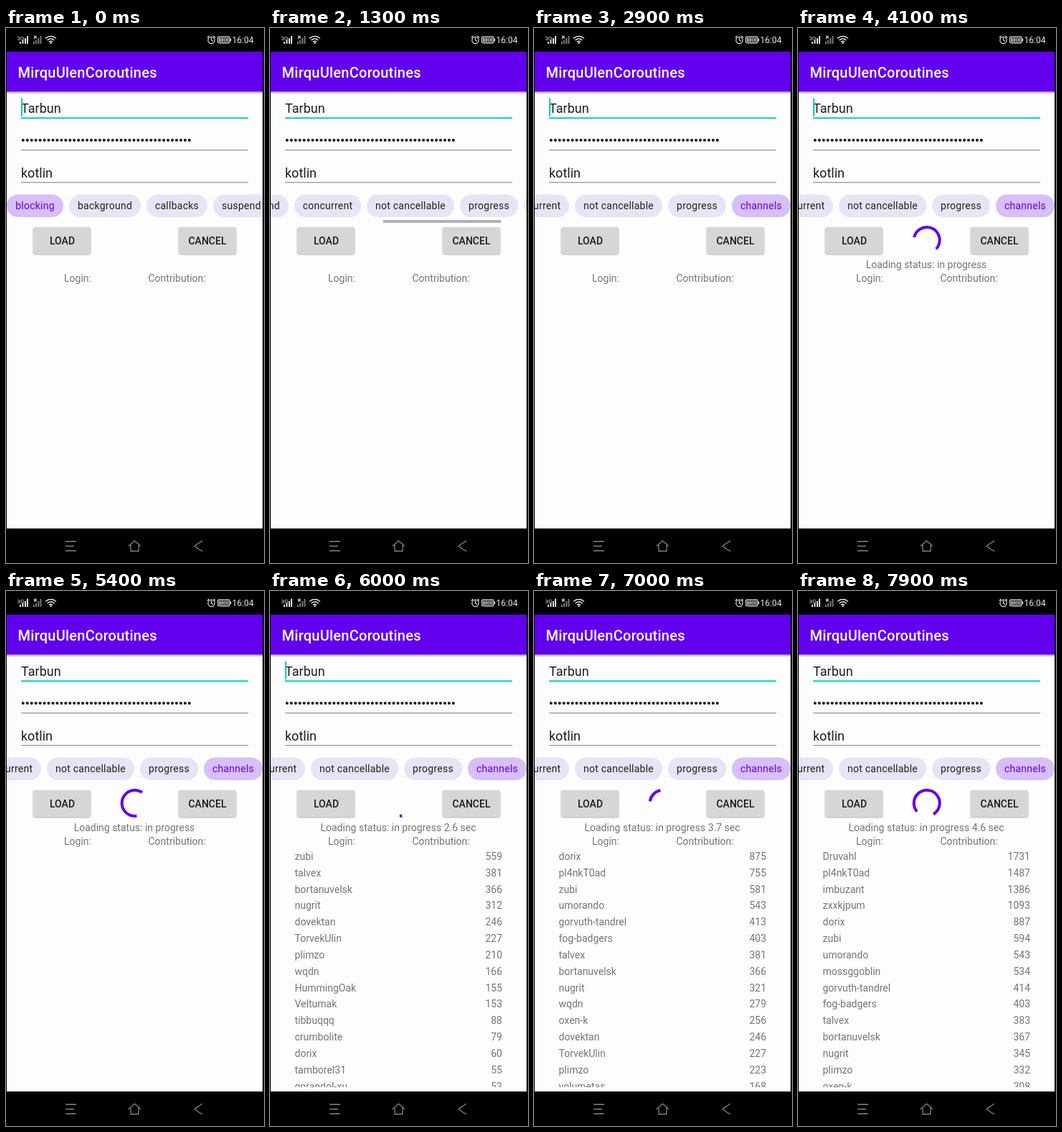
Animation of 360 by 744 pixels, one loop 8000 ms. Source, as an HTML page:

```html
<!DOCTYPE html>
<html lang="en">
<head>
<meta charset="utf-8">
<title>Coroutines demo</title>
<style>
  html, body { margin: 0; width: 100%; height: 100%; overflow: hidden; background: #000; }
  svg { display: block; font-family: Roboto, sans-serif; }
  .field { font-size: 18px; fill: #1d1d1d; }
  .chip { font-size: 14px; letter-spacing: .25px; fill: #222; text-anchor: middle; }
  .button { font-size: 14px; font-weight: 500; fill: #1c1c1c; text-anchor: middle; }
  .label { font-size: 14px; fill: #757575; }
  .mid { text-anchor: middle; }
  .end { text-anchor: end; }
  .line { fill: none; stroke: #858585; stroke-width: 1.3; }
  .icon { fill: none; stroke: #e4e4e4; stroke-width: 1.2; }
</style>
</head>
<body>
<svg width="360" height="744" viewBox="0 0 360 744">
  <defs>
    <clipPath id="screen"><rect x="1" y="33" width="357" height="663"/></clipPath>
    <clipPath id="listArea"><rect x="1" y="358" width="357" height="332"/></clipPath>
    <linearGradient id="barShadow" x2="0" y2="1">
      <stop stop-color="#000" stop-opacity=".3"/>
      <stop offset="1" stop-color="#000" stop-opacity="0"/>
    </linearGradient>
    <filter id="lift" x="-10%" y="-20%" width="120%" height="150%">
      <feDropShadow dx="0" dy="1" stdDeviation=".9" flood-opacity=".32"/>
    </filter>
  </defs>
  <rect width="360" height="744"/>

  <!-- status bar -->
  <g fill="#e4e4e4">
    <text x="15.5" y="17" font-size="8">3G</text>
    <path d="M19 22v-3h2v3zM22.500 22v-5h2v5zM26 22v-8h2v8zM29 22v-11h2v11z"/>
    <path fill="#777" d="M38 22v-3h2v3zM41 22v-5h2v5zM44.300 22v-8h2v8zM47.500 22v-11h2v11z"/>
    <path class="icon" d="M39 11l3.500 3.500M42.500 11l-3.500 3.500"/>
    <path class="icon" style="stroke-width:1.5" d="M55 14.500q7.500-6 15 0M57.500 17q5-4 10 0M60 19.300q2.500-2 5 0"/>
    <circle cx="62.500" cy="20.800" r="1.300"/>
    <path class="icon" d="M286.500 13.500v3.500l2.500 1.500M281 13.500l2.500-2.500M292 13.500l-2.500-2.500"/>
    <circle class="icon" cx="286.500" cy="17" r="4.600"/>
    <rect class="icon" x="295.600" y="12.200" width="16.500" height="8.600" rx="1.500"/>
    <rect x="297" y="13.600" width="13.700" height="5.800" fill="#aaa"/>
    <rect x="312.700" y="14.700" width="1.500" height="3.600"/>
    <text class="mid" x="304" y="19" font-size="7" fill="#111">100</text>
    <text class="end" x="345.500" y="21" font-size="12">16:04</text>
  </g>

  <g clip-path="url(#screen)">
    <rect y="33" width="360" height="663" fill="#fdfdfd"/>
    <rect y="33" width="360" height="55.500" fill="#6200ee"/>
    <rect y="88.500" width="360" height="4" fill="url(#barShadow)"/>
    <text x="16.500" y="68.500" font-size="20" font-weight="500" letter-spacing=".25" fill="#fff">MirquUlenCoroutines</text>

    <text class="field" x="21" y="118">Tarbun</text>
    <rect x="21" y="124.300" width="317" height="2" fill="#03cdb9"/>
    <rect id="cursor" x="21" y="98" width="2" height="25" fill="#03cdb9"/>
    <g id="dots" fill="#1d1d1d"></g>
    <rect x="21" y="169.300" width="317" height="1" fill="#7a7a7a"/>
    <text class="field" x="21" y="208">kotlin</text>
    <rect x="21" y="214.300" width="317" height="1" fill="#7a7a7a"/>

    <g id="chips"></g>
    <rect id="scrollbar" y="267" width="164.500" height="4" fill="#b3afb3"/>

    <rect id="load" x="38" y="277" width="80" height="37" rx="2" filter="url(#lift)"/>
    <text class="button" x="78.500" y="300.500">LOAD</text>
    <rect x="241" y="277" width="80" height="37" rx="2" fill="#d6d6d6" filter="url(#lift)"/>
    <text class="button" x="281" y="300.500">CANCEL</text>
    <circle id="spinner" cx="179.700" cy="295" r="18" pathLength="360" fill="none" stroke="#6200ee" stroke-width="4"/>

    <text id="status" class="label mid" x="179" y="333.500"></text>
    <text class="label" x="81" y="353">Login:</text>
    <text class="label" x="198.500" y="353">Contribution:</text>
    <g id="list" class="label" clip-path="url(#listArea)"></g>
  </g>

  <!-- navigation bar -->
  <path class="line" d="M83 714h15M83 720.500h12M83 727h15"/>
  <path class="line" d="M171 720.500l8.500-7.500 8.500 7.500M174 719v8.500h11v-8.500"/>
  <path class="line" d="M274 713l-11 7.500 11 7.500"/>
</svg>
<script>
const LOOP = 8000, STEP = 100, ROWS = 15;
const $ = id => document.getElementById(id);
const clamp = x => Math.min(1, Math.max(0, x));

// Piecewise linear value through [time, value] pairs.
function track(keys, t) {
  if (t <= keys[0][0]) return keys[0][1];
  for (let i = 1; i < keys.length; i++) {
    const [a, va] = keys[i - 1], [b, vb] = keys[i];
    if (t <= b) return va + (vb - va) * (t - a) / (b - a);
  }
  return keys[keys.length - 1][1];
}

// Bezier easing with control points (.4, 0) and (.2, 1).
function ease(x) {
  let lo = 0, hi = 1;
  for (let i = 0; i < 20; i++) {
    const s = (lo + hi) / 2, r = 1 - s;
    if (3 * r * r * s * .4 + 3 * r * s * s * .2 + s ** 3 < x) lo = s; else hi = s;
  }
  return lo * lo * (3 - 2 * lo);
}

const scrollKeys = [[100, 0], [250, 25], [450, 110], [650, 185], [850, 215],
                    [1000, 232], [1150, 280], [1300, 342], [1450, 400], [1600, 420]];
const barKeys = [[50, 0], [200, 1], [1700, 1], [2100, 0]];
const chipPress = [[2250, 0], [2400, 1], [2600, 1], [2900, 0]];
const loadPress = [[3250, 0], [3400, 1], [3600, 1], [4000, 0]];
const spinKeys = [[3300, -.98], [5400, .62], [6400, 1.27], [7000, 1.75], [7900, 2.46]];
const blinks = [300, 800, 1300, 1800, 2300, 2800, 3300, 3800, 4300, 4800,
                5300, 5900, 6500, 7100, 7600];

const chips = [['blocking', 79], ['background', 100], ['callbacks', 85], ['suspend', 79],
               ['concurrent', 93], ['not cancellable', 122], ['progress', 81], ['channels', 82]];

// Login and its contribution count after each loading phase.
const people = [
  ['zubi', 559, 581, 594], ['talvex', 381, 381, 383], ['bortanuvelsk', 366, 366, 367],
  ['nugrit', 312, 321, 345], ['dovektan', 246, 246, 246], ['TorvekUlin', 227, 227, 227],
  ['plimzo', 210, 223, 332], ['wqdn', 166, 279, 290], ['HummingOak', 155, 155, 155],
  ['Veltumak', 153, 153, 153], ['tibbuqqq', 88, 88, 88], ['crumbolite', 79, 79, 79],
  ['dorix', 60, 875, 887], ['tamborel31', 55, 55, 55], ['gprandol-xu', 53, 53, 53],
  ['pl4nkT0ad', 0, 755, 1487], ['umorando', 0, 543, 543], ['gorvuth-tandrel', 0, 413, 414],
  ['fog-badgers', 0, 403, 403], ['oxen-k', 0, 256, 308], ['volumetas', 0, 168, 170],
  ['Druvahl', 0, 0, 1731], ['imbuzant', 0, 0, 1386], ['zxxkjpum', 0, 0, 1093],
  ['mossggoblin', 0, 0, 534]
];
const phases = [[5500, 400], [6450, 500], [7100, 600]];

$('dots').innerHTML = Array.from({ length: 40 }, (_, i) =>
  `<circle cx="${23.8 + i * 5.95}" cy="156" r="2.1"/>`).join('');

let x = 1;
$('chips').innerHTML = chips.map(([name, w]) => {
  const chip = `<g><rect x="${x}" y="231.500" width="${w}" height="31.500" rx="15.750"/>` +
    `<text class="chip" x="${x + w / 2}" y="252">${name}</text></g>`;
  x += w + 8;
  return chip;
}).join('');
const chipNodes = [...$('chips').children];

$('list').innerHTML = Array.from({ length: ROWS }, (_, i) => {
  const y = 374 + i * 22.83;
  return `<text x="34.500" y="${y}"></text><text class="end" x="324" y="${y}"></text>`;
}).join('');
const cells = [...$('list').children];

function drawChips(t) {
  const shift = track(scrollKeys, t);
  $('chips').setAttribute('transform', `translate(${-shift})`);
  $('scrollbar').setAttribute('x', 1 + shift * 357 / 778);
  $('scrollbar').setAttribute('opacity', track(barKeys, t));
  const selected = t < 2500 ? 0 : chips.length - 1;
  const press = track(chipPress, t);
  chipNodes.forEach((node, i) => {
    const on = i === selected, dark = i === chips.length - 1 ? press * 12 : 0;
    const base = on ? [215, 191, 249] : [232, 228, 246];
    node.firstChild.style.fill = `rgb(${base.map(c => c - dark)})`;
    node.lastChild.style.fill = on ? '#6200ee' : '';
  });
}

function drawSpinner(t) {
  const on = t >= 3400;
  $('spinner').setAttribute('visibility', on ? 'visible' : 'hidden');
  if (!on) return;
  const turn = track(spinKeys, t), n = Math.floor(turn), u = turn - n;
  const base = 306 * turn + .037 * (t - 5400) - 436 + 270 * n;
  const tail = 270 * ease(clamp(2 * u - 1));
  const head = 270 * ease(clamp(2 * u)) + 11;
  $('spinner').setAttribute('transform', `rotate(${base + tail - 90} 179.7 295)`);
  $('spinner').setAttribute('stroke-dasharray', `${head - tail} 360`);
}

function countAt(person, i, t) {
  let count = 0;
  phases.forEach(([start, span], p) => {
    if (t >= start + span * (i * 7 % 6) / 6) count = person[p + 1];
  });
  return count;
}

function drawList(t) {
  const rows = people.map((p, i) => [p[0], countAt(p, i, t)])
    .filter(r => r[1]).sort((a, b) => b[1] - a[1]);
  for (let i = 0; i < ROWS; i++) {
    const [name, count] = rows[i] || ['', ''];
    cells[2 * i].textContent = name;
    cells[2 * i + 1].textContent = count;
  }
}

function drawStatus(t) {
  const tenths = Math.floor((t - 3350) * 1.015 / 100);
  const time = t < phases[0][0] ? '' : ` ${(tenths / 10).toFixed(1)} sec`;
  $('status').textContent = t < 3400 ? '' : 'Loading status: in progress' + time;
}

function draw(t) {
  const toggles = blinks.filter(b => b <= t).length;
  $('cursor').setAttribute('visibility', toggles % 2 ? 'hidden' : 'visible');
  const grey = 214 - 24 * track(loadPress, t);
  $('load').style.fill = `rgb(${grey},${grey},${grey})`;
  drawChips(t);
  drawSpinner(t);
  drawStatus(t);
  drawList(t);
}

const begin = performance.now();
let last = -1;
function tick() {
  const time = (performance.now() - begin + .5) % LOOP;
  const t = Math.floor(time / STEP) * STEP;
  if (t !== last) draw(last = t);
  requestAnimationFrame(tick);
}
tick();
</script>
</body>
</html>
```
